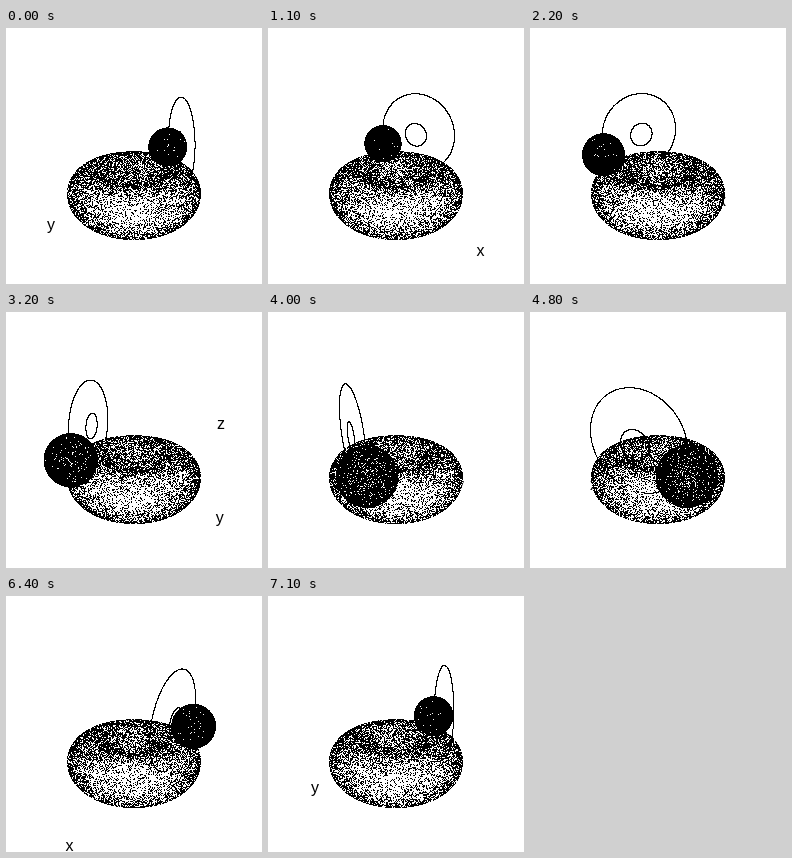
Write an HTML page with a canvas that moves like this. It is 256 px wide and 256 px high and loops after 7200 ms.

```html
<!DOCTYPE html>
<html lang="en">
<head>
<meta charset="utf-8">
<title>Rotating torus, sphere and rings</title>
<style>
  html, body { margin: 0; height: 100%; overflow: hidden; background: #fff; }
  canvas { display: block; width: 100vw; height: 100vh; image-rendering: pixelated; }
</style>
</head>
<body>
<canvas id="stage" width="256" height="256"></canvas>
<script>
const SIZE = 256, STEPS = 72, STEP_MS = 100;
const FOCAL = 221.7, CAM = 9.35, COS = 0.935, SIN = 0.355;
const TORUS = { R: 1.92, r: 0.94, z: -1.47 };
const RING_ORBIT = 1.9;
const ctx = document.getElementById('stage').getContext('2d', { willReadFrequently: true });
const rad = deg => deg * Math.PI / 180;

// World axes: x right, y away from the viewer, z up.
function project(x, y, z) {
  const depth = CAM - SIN * z + COS * y;
  return {
    x: 128 + FOCAL * x / depth,
    y: 128 - FOCAL * (COS * z + SIN * y) / depth,
    depth
  };
}

// Point on a turntable; zero degrees is the far side.
function orbit(radius, deg, z) {
  const a = rad(deg);
  return project(-radius * Math.sin(a), radius * Math.cos(a), z);
}

function random(x, y, seed) {
  let h = Math.imul(x + 1, 374761393) ^ Math.imul(y + 1, 668265263) ^ Math.imul(seed + 1, 1274126177);
  h = Math.imul(h ^ (h >>> 15), 2246822519);
  h = Math.imul(h ^ (h >>> 13), 3266489917);
  return ((h ^ (h >>> 16)) >>> 0) / 4294967296;
}

// The torus spins about its own axis, so its depth and brightness are fixed.
const torusDepth = new Float32Array(SIZE * SIZE).fill(Infinity);
const torusLight = new Float32Array(SIZE * SIZE);

function traceTorus(px, py) {
  const u = (px + 0.5 - 128) / FOCAL, v = (py + 0.5 - 128) / FOCAL;
  const dy = COS - SIN * v, dz = -SIN - COS * v, len = Math.hypot(u, dy, dz);
  let depth = 5;
  for (let i = 0; i < 90 && depth < 14; i++) {
    const x = u * depth, y = -CAM * COS + dy * depth;
    const z = CAM * SIN + dz * depth - TORUS.z;
    const rho = Math.hypot(x, y), q = rho - TORUS.R;
    const tube = Math.hypot(q, z), gap = tube - TORUS.r;
    if (gap < 0.004) {
      const facing = -(q * (x * u + y * dy) / rho + z * dz) / (tube * len);
      const i = py * SIZE + px;
      torusDepth[i] = depth;
      torusLight[i] = 0.82 * Math.max(0, facing) ** 0.9 * (7.1 / depth) ** 1.4;
      return;
    }
    depth += gap / len;
  }
}
for (let y = 115; y < 220; y++) for (let x = 55; x < 202; x++) traceTorus(x, y);

// Labels outside the depth range or cut by the lower edge are not drawn.
function drawLabel(text, p) {
  if (p.depth > 4.8 && p.depth < 13.9 && p.y < 252) ctx.fillText(text, p.x, p.y + 4);
}

function draw(step) {
  const turn = step * 360 / STEPS;
  ctx.fillStyle = '#fff';
  ctx.fillRect(0, 0, SIZE, SIZE);
  ctx.fillStyle = '#000';
  ctx.font = '16px "Liberation Sans", Arial, sans-serif';
  ctx.textAlign = 'center';
  drawLabel('x', orbit(3.84, turn + 185, -3.3));
  drawLabel('y', orbit(3.84, turn + 95, -3.3));
  drawLabel('z', orbit(5.4, turn + 140, -0.14));

  const image = ctx.getImageData(0, 0, SIZE, SIZE), data = image.data;
  const plot = (i, value) => { data[4 * i] = data[4 * i + 1] = data[4 * i + 2] = value; };
  const stipple = (x, y, light) => plot(y * SIZE + x, random(x, y, step) < light ? 255 : 0);

  for (let i = 0; i < SIZE * SIZE; i++) {
    if (torusDepth[i] < Infinity) stipple(i % SIZE, Math.floor(i / SIZE), torusLight[i]);
  }

  // Upright rings, tangent to their orbit; the near half shows through the torus.
  const ringTurn = rad(turn - 85), c = Math.cos(ringTurn), s = Math.sin(ringTurn);
  const bias = c < 0 ? 0.9 : 0;
  for (const [radius, height] of [[1.89, 0.5], [0.56, 0.46]]) {
    for (let a = 0; a < 2 * Math.PI; a += 0.004) {
      const t = radius * Math.cos(a);
      const p = project(-RING_ORBIT * s + t * c, RING_ORBIT * c + t * s, height + radius * Math.sin(a));
      const i = Math.floor(p.y) * SIZE + Math.floor(p.x);
      if (p.depth - bias < torusDepth[i]) plot(i, 0);
    }
  }

  const ball = orbit(2.7, turn - 40, -0.287), r = FOCAL / ball.depth;
  for (let y = Math.floor(ball.y - r); y <= ball.y + r; y++) {
    for (let x = Math.floor(ball.x - r); x <= ball.x + r; x++) {
      const d = Math.hypot(x + 0.5 - ball.x, y + 0.5 - ball.y) / r;
      if (d < 1) stipple(x, y, 0.16 * (1 - d * d) * (7.2 / ball.depth) ** 5);
    }
  }
  ctx.putImageData(image, 0, 0);
}

let shown = -1;
function tick() {
  const step = Math.floor(performance.now() / STEP_MS) % STEPS;
  if (step !== shown) draw(shown = step);
  requestAnimationFrame(tick);
}
tick();
</script>
</body>
</html>
```
